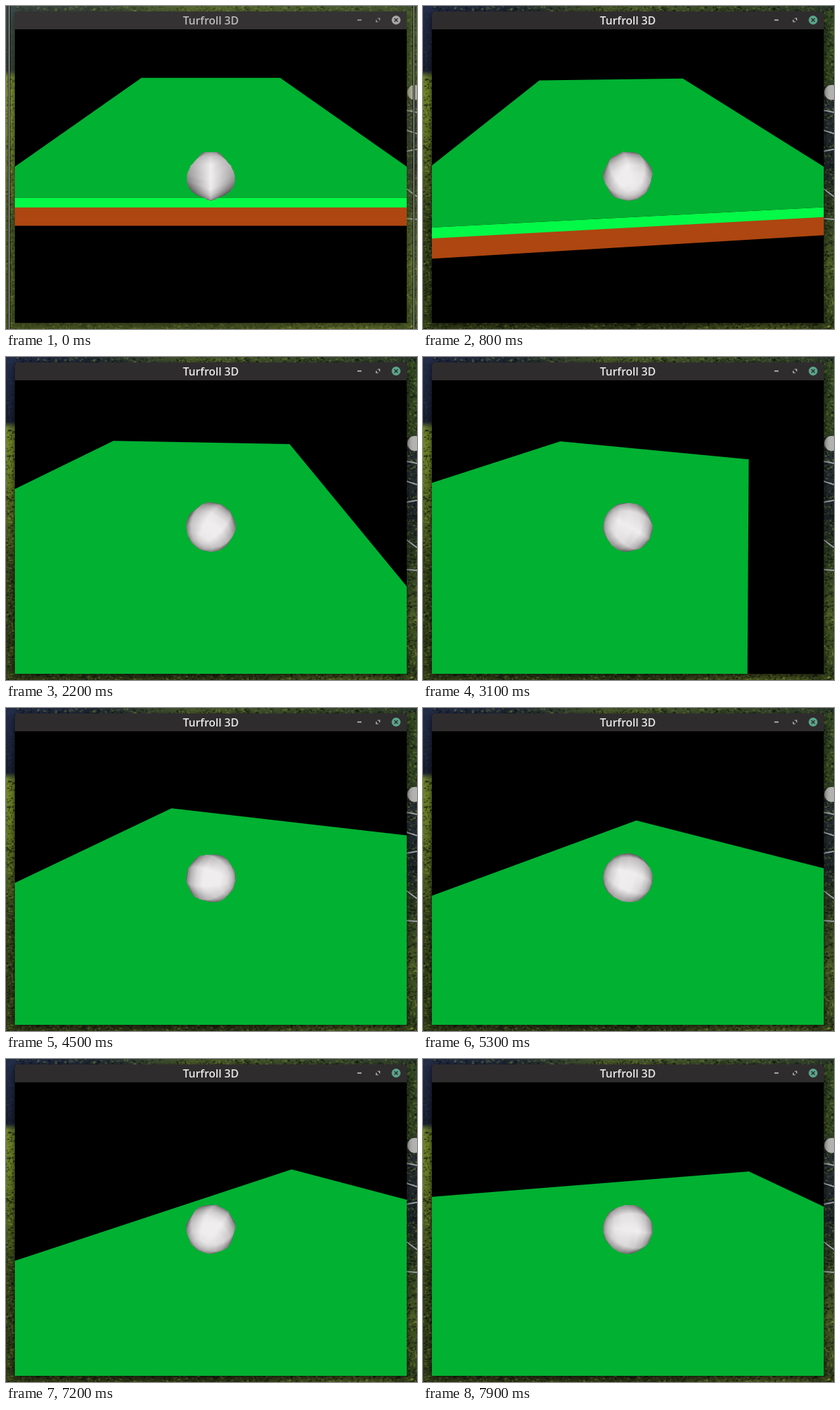
Animation of 600x471 px, one loop 8000 ms. Source, as an HTML page with a canvas:

```html
<!DOCTYPE html>
<html lang="en">
<head>
<meta charset="utf-8">
<title>Turfroll 3D</title>
<style>
  html, body { margin: 0; width: 100%; height: 100%; overflow: hidden; background: #000; }
  canvas { display: block; width: 600px; height: 471px; }
</style>
</head>
<body>
<canvas id="stage" width="600" height="471"></canvas>
<script>
const W = 600, H = 471, LOOP = 8000, STEP = 100;
const ctx = document.getElementById('stage').getContext('2d');

// Window content area
const VIEW = { x: 13, y: 34, w: 572, h: 428 };
const CX = VIEW.x + VIEW.w / 2, CY = VIEW.y + VIEW.h / 2;

// Camera: 60 degree lens, 30 degrees down, ten units from the ball
const FOCAL = VIEW.h / 2 / Math.tan(Math.PI / 6);
const COS = Math.cos(Math.PI / 6), SIN = 0.5;
const BACK = 10 * COS, EYE = 6;
const RADIUS = 0.98, HALF = 9.9, LENGTH = 29.8;

// seconds, ball x, ball z, camera yaw in degrees
const KEYS = [
  [0.5, 0, 0.05, 0],
  [1.3, -0.1, 5.15, 12.3],
  [3.1, 5.3, 13.16, -22.5],
  [4.5, -1.13, 17.95, -22.6],
  [5.3, -3.46, 21.27, -40.6],
  [6.5, -8.02, 17.63, -22.5],
  [7.9, -1.68, 18.18, -76.7]
];

function slope(i, c) {
  if (i === 0) return 0;
  const a = KEYS[i - 1], b = KEYS[Math.min(i + 1, KEYS.length - 1)];
  return (b[c] - a[c]) / (b[0] - a[0]);
}

function poseAt(ms) {
  const t = Math.min(Math.max(ms / 1000, KEYS[0][0]), KEYS[KEYS.length - 1][0]);
  let i = 0;
  while (i < KEYS.length - 2 && t >= KEYS[i + 1][0]) i++;
  const a = KEYS[i], b = KEYS[i + 1], d = b[0] - a[0], u = (t - a[0]) / d;
  const hermite = c => {
    const u2 = u * u, u3 = u2 * u;
    return (2 * u3 - 3 * u2 + 1) * a[c] + (u3 - 2 * u2 + u) * d * slope(i, c)
      + (3 * u2 - 2 * u3) * b[c] + (u3 - u2) * d * slope(i + 1, c);
  };
  const yaw = (a[3] + (b[3] - a[3]) * u) * Math.PI / 180;
  return { x: hermite(1), z: hermite(2), cos: Math.cos(yaw), sin: Math.sin(yaw) };
}

// Turns a vector in the plane of "up" and the rolling direction
function roll([x, y, z], dx, dz) {
  const dist = Math.hypot(dx, dz);
  if (dist < 1e-6) return [x, y, z];
  const ux = dx / dist, uz = dz / dist, c = Math.cos(dist), s = Math.sin(dist);
  const along = x * ux + z * uz, next = along * c + y * s;
  return [x + (next - along) * ux, y * c - along * s, z + (next - along) * uz];
}

const spins = [[[1, 0, 0], [0, 1, 0], [0, 0, 1]]];
for (let t = STEP; t < LOOP; t += STEP) {
  const a = poseAt(t - STEP), b = poseAt(t);
  spins.push(spins[spins.length - 1].map(axis => roll(axis, b.x - a.x, b.z - a.z)));
}

function sphere(slices, stacks) {
  const points = [], faces = [];
  for (let j = 0; j <= stacks; j++) {
    const p = Math.PI * j / stacks;
    for (let i = 0; i < slices; i++) {
      const q = 2 * Math.PI * i / slices;
      points.push([Math.sin(p) * Math.sin(q), Math.cos(p), -Math.sin(p) * Math.cos(q)]);
      if (j === stacks) continue;
      const a = j * slices + i, b = j * slices + (i + 1) % slices;
      faces.push([a, b, a + slices], [b, b + slices, a + slices]);
    }
  }
  return { points, faces };
}
const restMesh = sphere(5, 10), rollMesh = sphere(9, 10);

// World point to camera space: right, down, depth
function toCamera([x, y, z], pose) {
  const dx = x - pose.x, dz = z - pose.z;
  const fwd = dx * pose.sin + dz * pose.cos + BACK, drop = EYE - y;
  return [dx * pose.cos - dz * pose.sin, drop * COS - fwd * SIN, fwd * COS + drop * SIN];
}

const toScreen = ([r, d, depth]) => [CX + FOCAL * r / depth, CY + FOCAL * d / depth];

function clipNear(points, near = 0.1) {
  const out = [];
  points.forEach((a, i) => {
    const b = points[(i + 1) % points.length];
    if (a[2] >= near) out.push(a);
    if ((a[2] >= near) !== (b[2] >= near)) {
      const u = (near - a[2]) / (b[2] - a[2]);
      out.push(a.map((v, k) => v + (b[k] - v) * u));
    }
  });
  return out;
}

function fillFace(points, color, pose) {
  const shape = clipNear(points.map(p => toCamera(p, pose))).map(toScreen);
  if (shape.length < 3) return;
  ctx.fillStyle = color;
  ctx.beginPath();
  shape.forEach(p => ctx.lineTo(p[0], p[1]));
  ctx.fill();
}

function drawField(pose) {
  const corners = [[-HALF, 0], [HALF, 0], [HALF, LENGTH], [-HALF, LENGTH]];
  const ex = pose.x - BACK * pose.sin, ez = pose.z - BACK * pose.cos;
  corners.forEach((a, i) => {
    const b = corners[(i + 1) % 4];
    const outside = (b[0] - a[0]) * (ez - a[1]) - (b[1] - a[1]) * (ex - a[0]) < 0;
    if (!outside) return;
    const wall = depth => [[a[0], 0, a[1]], [b[0], 0, b[1]], [b[0], -depth, b[1]], [a[0], -depth, a[1]]];
    fillFace(wall(1.5), '#ad4610', pose);
    fillFace(wall(0.5), '#02f947', pose);
  });
  fillFace(corners.map(([x, z]) => [x, 0, z]), '#00b132', pose);
}

const SIZE = 90;
const ballCanvas = document.createElement('canvas');
ballCanvas.width = ballCanvas.height = SIZE;
const ballCtx = ballCanvas.getContext('2d');
const ballX = Math.round(CX - SIZE / 2), ballY = Math.round(CY - SIZE / 2);

function shadeTriangle(pixels, [a, b, c]) {
  const area = (b.x - a.x) * (c.y - a.y) - (c.x - a.x) * (b.y - a.y);
  if (Math.abs(area) < 1e-6) return;
  const low = k => Math.floor(Math.min(a[k], b[k], c[k]));
  const high = k => Math.ceil(Math.max(a[k], b[k], c[k]));
  for (let y = low('y'); y <= high('y'); y++) {
    for (let x = low('x'); x <= high('x'); x++) {
      const px = x + 0.5, py = y + 0.5;
      const v = ((px - a.x) * (c.y - a.y) - (c.x - a.x) * (py - a.y)) / area;
      const w = ((b.x - a.x) * (py - a.y) - (px - a.x) * (b.y - a.y)) / area;
      if (v < 0 || w < 0 || v + w > 1) continue;
      const light = a.light * (1 - v - w) + b.light * v + c.light * w;
      const o = (y * SIZE + x) * 4;
      pixels[o] = light;
      pixels[o + 1] = light - 3;
      pixels[o + 2] = light - 1;
      pixels[o + 3] = 255;
    }
  }
}

function drawBall(pose, ms) {
  const mesh = ms < 500 ? restMesh : rollMesh, spin = spins[ms / STEP];
  const verts = mesh.points.map(p => {
    const n = [0, 1, 2].map(k => p[0] * spin[0][k] + p[1] * spin[1][k] + p[2] * spin[2][k]);
    const cam = toCamera([pose.x + n[0] * RADIUS, 1 + n[1] * RADIUS, pose.z + n[2] * RADIUS], pose);
    const [x, y] = toScreen(cam);
    const facing = (10 - cam[2]) / RADIUS + 0.03 * cam[0];
    const light = 92 + 148 * Math.min(1, Math.max(0, facing * 1.12));
    return { x: x - ballX, y: y - ballY, depth: cam[2], light };
  });
  const depth = f => f[0].depth + f[1].depth + f[2].depth;
  const image = ballCtx.createImageData(SIZE, SIZE);
  mesh.faces.map(f => f.map(i => verts[i]))
    .sort((a, b) => depth(b) - depth(a))
    .forEach(f => shadeTriangle(image.data, f));
  ballCtx.putImageData(image, 0, 0);
  ctx.drawImage(ballCanvas, ballX, ballY);
}

// Hillside wallpaper, only its rim shows around the window
function makeWallpaper() {
  const canvas = document.createElement('canvas');
  canvas.width = W;
  canvas.height = H;
  const g = canvas.getContext('2d');
  let seed = 7;
  const rand = () => (seed = (seed * 16807) % 2147483647) / 2147483647;
  const strip = (x, y, w, h, stops) => {
    const fill = g.createLinearGradient(0, 0, w > h ? W : 0, w > h ? 0 : H);
    stops.forEach(([at, color]) => fill.addColorStop(at, color));
    g.fillStyle = fill;
    g.fillRect(x, y, w, h);
  };
  strip(0, 0, 300, H, [[0, '#222b48'], [0.2, '#151b2c'], [0.22, '#6f8328'], [0.4, '#5d7222'], [0.65, '#34431a'], [1, '#2c3816']]);
  strip(300, 0, 300, H, [[0, '#2f4424'], [0.22, '#31451f'], [0.3, '#262f33'], [0.5, '#1d2529'], [0.6, '#2b3b22'], [0.8, '#465824'], [1, '#2c3c1a']]);
  strip(0, 0, W, 8, [[0, '#222c48'], [0.2, '#1f2836'], [0.45, '#46562b'], [0.7, '#3c4d2a'], [1, '#2b3a2c']]);
  strip(0, 462, W, 9, [[0, '#333f18'], [0.5, '#2b3515'], [0.85, '#4a5620'], [1, '#333f1b']]);
  for (let i = 0; i < 2600; i++) {
    const side = rand(), x = side < 0.3 ? rand() * 14 : side < 0.6 ? 584 + rand() * 16 : rand() * W;
    const y = side < 0.6 ? rand() * H : side < 0.8 ? rand() * 9 : 461 + rand() * 10;
    g.fillStyle = rand() < 0.55 ? 'rgba(10,14,10,.45)' : 'rgba(150,165,70,.28)';
    if (x < 14 && y < 105) g.fillStyle = 'rgba(45,60,85,.2)';
    g.fillRect(x, y, 1 + rand() * 3, 1 + rand() * 2);
  }
  g.strokeStyle = '#9fa1a6';
  g.lineWidth = 2;
  [[152, 3], [181, 5], [212, -3], [266, 12], [310, 1]].forEach(([y, fall]) => {
    g.beginPath();
    g.moveTo(584, y);
    g.lineTo(W, y + fall);
    g.stroke();
  });
  g.fillStyle = '#b4b3b2';
  g.beginPath();
  g.ellipse(597, 126, 11, 11, 0, 0, 7);
  g.fill();
  g.shadowColor = 'rgba(0,0,0,.75)';
  g.shadowBlur = 9;
  g.shadowOffsetY = 2;
  g.fillStyle = '#000';
  g.fillRect(13, 9, 572, 453);
  return canvas;
}
const wallpaper = makeWallpaper();

function line(...p) {
  ctx.beginPath();
  for (let i = 0; i < p.length; i += 2) ctx.lineTo(p[i], p[i + 1]);
  ctx.stroke();
}

function drawTitleBar(active) {
  ctx.fillStyle = active ? '#2f2c2e' : '#343233';
  ctx.beginPath();
  ctx.roundRect(13, 8, 572, 26, [4, 4, 0, 0]);
  ctx.fill();
  ctx.fillStyle = active ? '#e9e7e6' : '#bcbab9';
  ctx.font = '600 16px "Open Sans", "Noto Sans", sans-serif';
  ctx.textAlign = 'center';
  ctx.textBaseline = 'alphabetic';
  ctx.fillText('Turfroll 3D', CX, 26.5);
  ctx.strokeStyle = active ? '#c9c7c6' : '#a5a3a2';
  ctx.lineWidth = 1.6;
  line(513, 20.5, 519, 20.5);
  ctx.lineWidth = 1.2;
  line(542.5, 18, 545.5, 18, 545.5, 21);
  line(540.5, 20, 540.5, 23, 543.5, 23);
  ctx.fillStyle = active ? '#5aa58c' : '#a9a7a6';
  ctx.beginPath();
  ctx.arc(569.5, 20.5, 6.5, 0, 7);
  ctx.fill();
  ctx.strokeStyle = '#2d2b2c';
  ctx.lineWidth = 1.5;
  line(567, 18, 572, 23);
  line(572, 18, 567, 23);
}

function drawSelection() {
  [4, 595].forEach(x => {
    ctx.fillStyle = '#0b0d0b';
    ctx.fillRect(x - 1, 0, 3, H);
    ctx.fillStyle = '#d4d4cc';
    ctx.fillRect(x, 0, 1, H);
  });
}

function draw(ms) {
  const pose = poseAt(ms);
  ctx.drawImage(wallpaper, 0, 0);
  if (ms < 100) {
    ctx.fillStyle = 'rgba(140,165,70,.22)';
    ctx.fillRect(0, 0, W, H);
    drawSelection();
  }
  drawTitleBar(ms >= 200);
  ctx.save();
  ctx.beginPath();
  ctx.rect(VIEW.x, VIEW.y, VIEW.w, VIEW.h);
  ctx.clip();
  ctx.fillStyle = '#000';
  ctx.fillRect(VIEW.x, VIEW.y, VIEW.w, VIEW.h);
  drawField(pose);
  drawBall(pose, ms);
  ctx.restore();
}

const start = performance.now();
let shown = -1;
function tick() {
  const ms = Math.floor((performance.now() - start) % LOOP / STEP) * STEP;
  if (ms !== shown) draw(shown = ms);
  requestAnimationFrame(tick);
}
tick();
</script>
</body>
</html>
```
